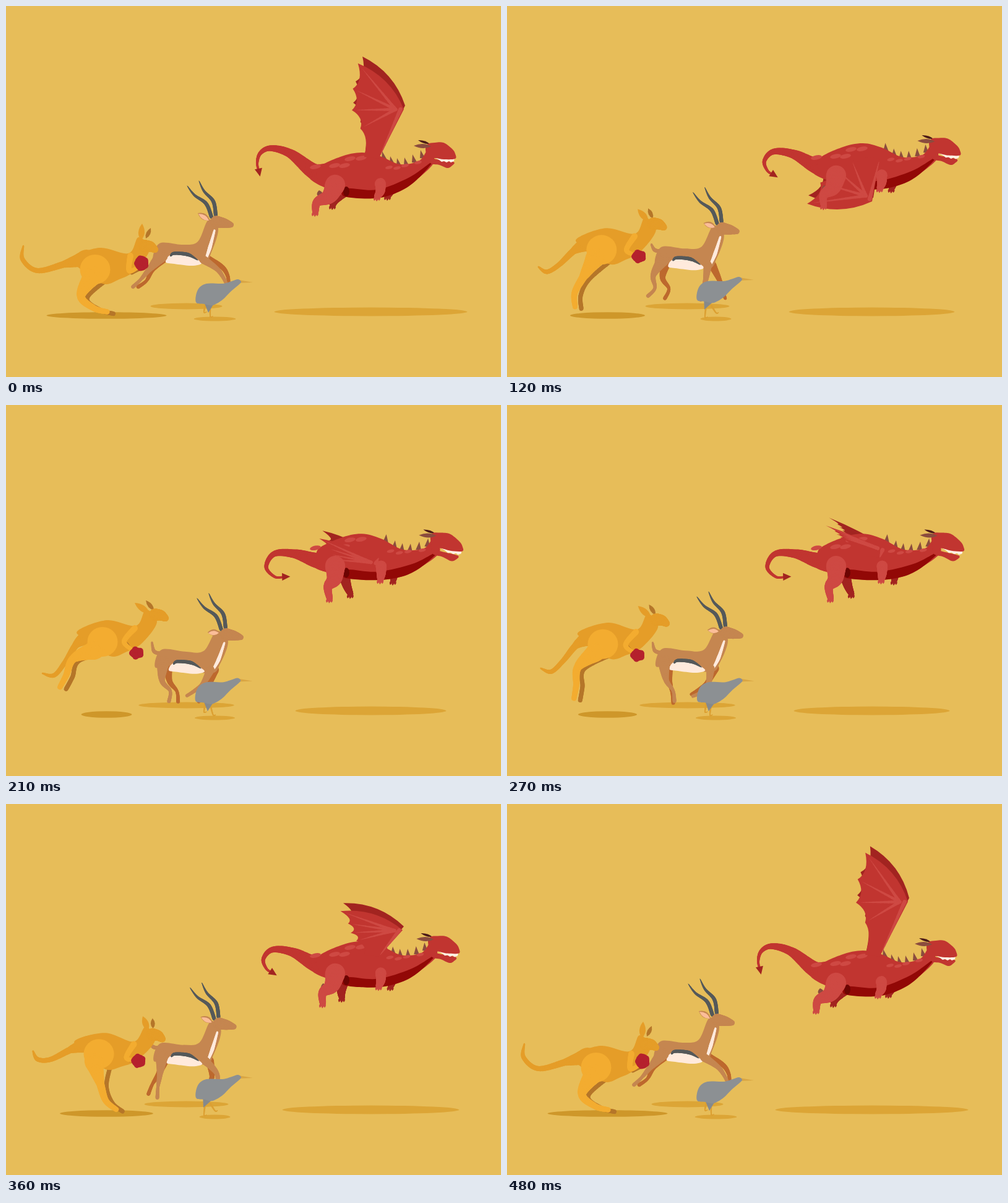
Animation, 800 px wide and 600 px high, one loop 510 ms. Source, as an HTML page with a canvas:

```html
<!DOCTYPE html>
<html lang="en">
<head>
<meta charset="utf-8">
<title>Running animals</title>
<style>
  html, body { margin: 0; height: 100%; overflow: hidden; background: #e7bd59; }
  canvas { display: block; }
</style>
</head>
<body>
<canvas id="stage" width="800" height="600"></canvas>
<script>
const ctx = document.getElementById('stage').getContext('2d');
const STEP = 30, LOOP = 510, CYCLE = 480;

const { PI, sin, cos, min, max } = Math;
const lerp = (a, b, k) => a + (b - a) * k;
const clamp = v => max(0, min(1, v));
const between = (a, b, k) => [lerp(a[0], b[0], k), lerp(a[1], b[1], k)];
const add = (p, x, y) => [p[0] + x, p[1] + y];
const polar = (p, length, deg) => add(p, length * cos(deg * PI / 180), length * sin(deg * PI / 180));
const pairs = v => Array.from({ length: v.length / 2 }, (_, i) => [v[2 * i], v[2 * i + 1]]);
const mix = (a, b, k) => pairs(a.map((v, i) => lerp(v, b[i], k)));

// Joint angle: one wave per cycle, plus an optional wave at double speed.
function swing([mean, amp, peak, amp2 = 0, peak2 = 0], t) {
  const w = 2 * PI / CYCLE;
  return mean + amp * cos(w * (t - peak)) + amp2 * cos(2 * w * (t - peak2));
}

function chain(start, lengths, swings, t) {
  const p = [start];
  lengths.forEach((length, i) => p.push(polar(p[i], length, swing(swings[i], t))));
  return p;
}

function fill(color, trace) {
  ctx.fillStyle = color;
  ctx.beginPath();
  trace();
  ctx.fill();
}

const poly = (color, p) => fill(color, () => p.forEach(q => ctx.lineTo(...q)));

function ellipse(color, x, y, rx, ry, turn = 0) {
  fill(color, () => ctx.ellipse(x, y, rx, ry, turn, 0, 7));
}

function blob(color, p) {
  const at = i => p[(i + p.length) % p.length];
  fill(color, () => {
    ctx.moveTo(...p[0]);
    p.forEach((a, i) => {
      const b = at(i + 1), before = at(i - 1), after = at(i + 2);
      ctx.bezierCurveTo(a[0] + (b[0] - before[0]) / 6, a[1] + (b[1] - before[1]) / 6,
        b[0] - (after[0] - a[0]) / 6, b[1] - (after[1] - a[1]) / 6, ...b);
    });
  });
}

// Tapered rounded stroke along a curve through the points.
function limb(color, p, widths) {
  ctx.strokeStyle = color;
  ctx.lineCap = 'round';
  const at = i => p[max(0, min(p.length - 1, i))];
  let last = p[0];
  for (let i = 0; i < p.length - 1; i++) {
    for (let k = 1; k <= 12; k++) {
      const u = k / 12;
      const next = [0, 1].map(n => {
        const [a, b, c, d] = [-1, 0, 1, 2].map(j => at(i + j)[n]);
        return b + u * (c - a + u * (2 * a - 5 * b + 4 * c - d + u * (3 * b - a - 3 * c + d))) / 2;
      });
      ctx.lineWidth = lerp(widths[i], widths[i + 1], u);
      ctx.beginPath();
      ctx.moveTo(...last);
      ctx.lineTo(...next);
      ctx.stroke();
      last = next;
    }
  }
}

function leaf(color, base, tip, width) {
  const dx = tip[0] - base[0], dy = tip[1] - base[1], k = width / Math.hypot(dx, dy);
  const mid = between(base, tip, .45);
  fill(color, () => {
    ctx.moveTo(...base);
    ctx.quadraticCurveTo(mid[0] - dy * k, mid[1] + dx * k, ...tip);
    ctx.quadraticCurveTo(mid[0] + dy * k, mid[1] - dx * k, ...base);
  });
}

// 0 at both ends of the cycle and 1 in the middle
const bump = u => (1 - cos(2 * PI * u)) / 2;
const leap = t => sin(PI * (t / CYCLE) ** .86) ** 1.5;

function shadows(t) {
  const air = leap(t) ** 1.4, sand = '#dca536';
  ellipse(sand, 589.5, 494.5, 156 - 34 * air, 7);
  ellipse(sand, 291.5, 485.5, 58 + 20 * bump(t / CYCLE), 5);
  ellipse(sand, 337.5, 506, 29.5 + 4.5 * cos(4 * PI * t / CYCLE), 3.5);
  ellipse('#ce972a', 162.5, 500.5, 97 - 56 * air, 5.3);
}

function gazelle(t) {
  const coat = '#c58650', far = '#bd692e', dark = '#55595a', cream = '#ffeadc';
  const dip = bump((t / CYCLE) ** .9) ** 1.5;
  // The body sinks and the neck reaches forward.
  const stoop = ([x, y]) => {
    const reach = clamp((x - 280) / 60);
    return [x + dip * (3 + 13 * reach), y + dip * (12 + 10 * reach)];
  };
  const hip = stoop([251, 404]), shoulder = stoop([319, 410]);
  const hind = (color, x, lead, width) => limb(color, chain(add(hip, x, 0), [30, 21, 17],
    [[109, 26, 40], [91, 40, 465], [112, 31, 50]], t + lead), [width, 9, 5, 6]);
  const front = (color, x, lead) => limb(color, chain(add(shoulder, x, 0), [26, 17, 15],
    [[73, 46, 195], [96, 45, 220], [109, 46, 255]], t + lead), [14, 8, 6, 5]);

  hind(far, 7, 50, 18);
  front(far, 7, -60);
  limb(coat, mix([248, 392, 238, 391, 231, 387], [248, 402, 239, 398, 236, 384], dip), [6, 6, 3]);
  const body = pairs([248, 384, 285, 386, 310, 381, 327, 346, 343, 360, 332, 398,
    318, 416, 262, 410, 238, 412]).map(stoop);
  blob(coat, body);
  limb(cream, [add(body[4], -6, 3), add(body[5], -3, -6), add(body[6], 4, -4)], [3, 6, 3]);
  const flank = p => pairs(p).map(q => add(q, 5 * dip, 2 + 15 * dip));
  blob(cream, flank([258, 412, 268, 400, 300, 404, 316, 414, 300, 418, 272, 415]));
  limb(dark, flank([266, 402, 272, 398, 294, 400, 310, 409]), [2, 5, 6, 1]);
  hind(coat, 0, 0, 22);
  front(coat, 0, 0);

  const nose = stoop([368, 354]);
  for (const [x, y, dx, dy] of [[-36, -13, 39, 50], [-29, -16, 27, 55]]) {
    const base = add(nose, x, y), tip = add(base, -dx, -dy);
    limb(dark, [base, add(tip, .65 * dx + .1 * dy, .65 * dy - .1 * dx), between(tip, base, .3), tip],
      [6, 6, 4, 1]);
  }
  limb(coat, [add(nose, -28, -5), add(nose, -16, -3), add(nose, -4, 0)], [20, 16, 8]);
  const ear = add(nose, -39, -8), earTip = add(ear, -19, -11 + 11 * dip);
  leaf(coat, ear, earTip, 10);
  leaf('#fbbd98', add(ear, -1, 1), add(earTip, 1, 1), 7);
}

function kiwi(t) {
  const phase = 4 * PI * t / CYCLE, c = cos(phase), x = sin(phase), y = 2 * c - 2;
  const at = p => pairs(p).map(q => add(q, x, y));
  const feet = [[320, 499 - 4 * c], [334 - 6 * cos(phase - .9), 499 + 3 * c]];
  feet.forEach((foot, i) => limb('#dca033', [[322 + 8 * i, 484], foot, add(foot, 4, 0)], [3, 2, 1]));
  poly('#d9a543', at([376, 443, 399, 447, 376, 448]));
  poly('#85898c', [...at([318, 474]), [323 + 4 * c, 493.5 + 2.5 * c], ...at([338, 478])]);
  blob('#8c9093', at([307, 479, 310, 459, 324, 449, 350, 449, 365, 445, 375, 442,
    380, 446, 376, 451, 363, 462, 350, 475, 334, 484, 321, 482]));
}

function kangaroo(t) {
  const coat = '#e59d28', light = '#f3ac30', dark = '#b57629', red = '#b5212d';
  const lift = leap(t), move = [12 * lift, -43 * lift];
  const tilt = .11 * max(0, -sin(2 * PI * t / CYCLE));
  const part = (a, b) => mix(a, b, lift);
  const inBody = paint => {
    ctx.save();
    ctx.translate(144 + move[0], 426 + move[1]);
    ctx.rotate(tilt);
    ctx.translate(-144, -426);
    paint();
    ctx.restore();
  };

  const leg = chain(add([140, 436], 4 * lift, -40 * lift), [38, 29, 22],
    [[118, 30, 170, 20], [84, 38, 190, 11, 120], [64, 54, 205]], t);
  limb(dark, leg.map((p, i) => add(p, i ? 10 : 28, 3)), [7, 7, 7, 7]);

  inBody(() => {
    limb(coat, part([28, 388, 27, 410, 51, 428, 96, 417, 130, 408],
      [47, 477, 66, 480, 84, 458, 102, 430, 123, 416]), [2, 7, 8, 11, 28]);
    blob(coat, pairs([104, 408, 151, 391, 198, 400, 214, 374, 232, 394, 208, 428, 183, 442, 156, 449, 116, 422]));
  });
  ellipse(light, ...add([144, 426], ...move), 24.5, 24);
  limb(light, leg, [32, 13, 10, 8]);

  inBody(() => {
    const [nose, earA, tipA, earB, tipB] = part([246, 393, 218, 379, 220, 352, 226, 376, 234, 359],
      [251, 387, 220, 380, 196, 363, 227, 375, 214, 359]);
    leaf(dark, earB, tipB, 7);
    limb(coat, [add(nose, -22, -5), add(nose, -13, -4), add(nose, -5, 1)], [20, 17, 10]);
    leaf(coat, earA, tipA, 10);

    const [shoulder, elbow, wrist, fist] = part([201, 404, 199, 428, 213, 423, 219, 416],
      [196, 404, 179, 425, 190, 438, 199, 444]);
    const ry = 12 - 3 * lift;
    limb(dark, [add(elbow, 4, 4), add(wrist, 2, 3)], [5, 5]);
    limb(light, [shoulder, elbow, wrist], [10, 8, 6]);
    ellipse(red, ...fist, 11, ry);
    for (let a = .5; a < 6; a += 1.3)
      ellipse(red, fist[0] + cos(a) * 7, fist[1] + sin(a) * ry * .65, 5, 5);
  });
}

// Wing stroke: time, wrist x and y, angle of the leading finger, angle between fingers
const STROKE = [
  [0, 643, 167, 225, -23], [60, 630, 228, 198, -10], [120, 590, 316, 178, 22],
  [210, 603, 257, 203, -6], [270, 612, 236, 203, -2], [360, 641, 204, 197, -10],
  [480, 648, 158, 229, -25]
];

function wingPose(t) {
  const i = max(1, STROKE.findIndex(k => k[0] >= t));
  const a = STROKE[i - 1], b = STROKE[i], k = (t - a[0]) / (b[0] - a[0]);
  return a.map((v, n) => lerp(v, b[n], k)).slice(1);
}

function wing(color, wrist, lead, step, ribColor) {
  const tips = [105, 89, 84, 77].map((length, i) => polar(wrist, length, lead + i * step));
  const rear = [579, 244], root = [602, 247];
  const bend = polar(between(wrist, tips[0], .5), 22 * max(-1, min(1, -step / 10)), lead + 90);
  fill(color, () => {
    ctx.moveTo(...wrist);
    ctx.quadraticCurveTo(...bend, ...tips[0]);
    [...tips, rear].reduce((a, b) => {
      ctx.quadraticCurveTo(...between(between(a, b, .5), wrist, .17), ...b);
      return b;
    });
    ctx.lineTo(...root);
  });
  if (!ribColor) return;
  const knot = between(wrist, tips[2], .16);
  tips.forEach(p => limb(ribColor, [knot, between(knot, p, .88)], [6, .5]));
  limb(ribColor, [between(wrist, knot, .4), between(wrist, root, .92)], [7, 1]);
}

function dragon(t) {
  const red = '#c13530', light = '#ce4943', deep = '#920806', far = '#a22420', horn = '#8b4c3e';
  const rise = bump(t / CYCLE);
  // The trunk rises most; the head rises less and pushes forward.
  const bob = ([x, y]) => {
    const f = clamp((x - 590) / 130);
    return [x + 12 * f * rise, y - (30 - 19 * f) * rise];
  };
  const at = p => pairs(p).map(bob);
  const leg = (color, x, y, low, high, widths) => {
    const hip = bob([x, y]), p = [hip, ...mix(low, high, rise).map(q => add(hip, ...q))];
    limb(color, p, widths);
    for (const k of [-1, 0, 1])
      leaf(color, add(p.at(-1), k * 3, 0), add(p.at(-1), k * 4 - 1, 8 - k * k), 4);
    return p;
  };

  const [wx, wy, lead, step] = wingPose(t);
  wing(far, [wx + 2, wy - 6], lead + 4, step, null);
  leg(far, 545, 300, [-13, 13, -17, 22], [7, 22, 13, 35], [20, 14, 9]);
  leg(far, 624, 293, [-4, 9, -7, 14], [0, 8, -1, 15], [14, 12, 9]);

  const tail = mix([409, 268, 406, 254, 411, 238, 428, 230, 460, 239, 502, 270, 545, 275],
    [453, 278, 436, 279, 421, 263, 434, 241, 468, 241, 510, 252, 550, 246], rise);
  limb(red, tail, [3, 4, 6, 9, 14, 26, 56]);
  const heading = Math.atan2(tail[0][1] - tail[1][1], tail[0][0] - tail[1][0]) * 180 / PI;
  poly(far, [0, 130, 230].map(a => polar(tail[0], 8, heading + a)));

  at([611, 248, 624, 256, 635, 259, 647, 258, 660, 253, 673, 246]).forEach(([x, y]) =>
    poly(horn, [[x - 4, y], [x + lerp(-3, 2, rise), y - 13], [x + 5, y + 1]]));

  blob(red, at([503, 264, 540, 244, 575, 237, 605, 243, 637, 256, 668, 250, 683, 232, 692, 252,
    667, 278, 637, 299, 600, 310, 550, 308, 512, 290]));
  blob(deep, at([689, 252, 664, 281, 636, 300, 598, 311, 547, 308, 550, 295, 600, 297, 652, 277]));
  ellipse('#6d0503', ...bob([550, 300]), 5, 8);
  at([500, 260, 531, 258, 547, 258, 556, 247, 574, 246, 619, 261, 632, 262, 645, 258, 666, 253])
    .forEach((p, i) => ellipse(light, ...p, i < 5 ? 9 : 6, i < 5 ? 3.6 : 2.6, -.2));

  wing(red, [wx, wy], lead, step, light);

  const heel = add(bob([506, 304]), 13 * rise, 14 * rise);
  leaf(horn, add(heel, 2, 5), add(heel, 0, -6), 9);
  leg(light, 532, 289, [-10, 19, -29, 28, -32, 44], [-1, 21, -11, 34, -8, 53], [33, 24, 14, 10]);
  leg(light, 605, 287, [0, 12, -5, 21], [0, 12, -1, 22], [18, 15, 10]);

  // Head: the teeth lie between the jaw and the skull.
  const brow = bob([685, 225]);
  leaf('#4b1a17', add(brow, 0, -2), add(brow, -19, -8), 4);
  const jaw = p => at(p).map(q => add(q, -5 * rise, 2 * rise));
  blob(red, jaw([684, 238, 692, 247, 723, 252, 720, 259, 713, 262, 700, 257, 686, 254]));
  poly('#fff0e2', at([691, 244, 725, 245, 724, 251, 719, 253, 716, 251, 712, 253, 708, 251, 704, 252, 700, 249]));
  blob(red, at([678, 232, 682, 223, 693, 221, 707, 221, 721, 231, 726, 239, 726, 247, 708, 248, 692, 246, 683, 251]));
  leaf(horn, add(brow, 2, 2), add(brow, -26, 1), 7);
}

function draw(ms) {
  const t = Math.floor(ms % LOOP / STEP) * STEP;
  ctx.fillStyle = '#e7bd59';
  ctx.fillRect(0, 0, 800, 600);
  for (const paint of [shadows, gazelle, kiwi, kangaroo, dragon]) paint(t);
}

const start = performance.now();
function tick() {
  draw(performance.now() - start);
  requestAnimationFrame(tick);
}
tick();
</script>
</body>
</html>
```
